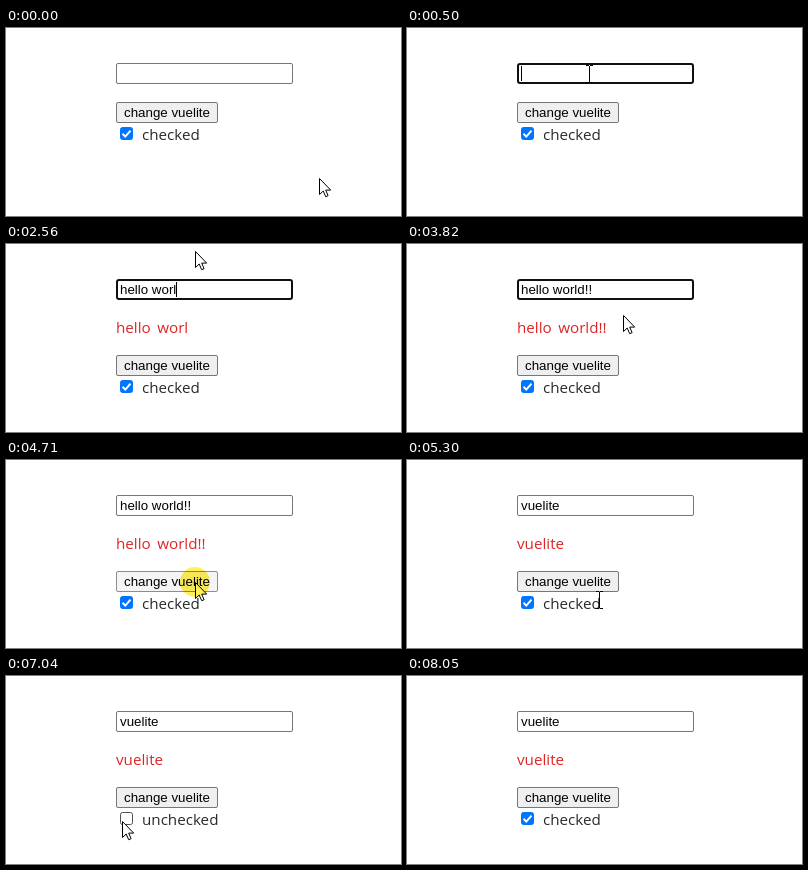
An HTML page with a canvas for the animation above (8.37 s loop, 395 by 188 pixels).

```html
<!DOCTYPE html>
<html lang="en">
<head>
<meta charset="utf-8">
<title>Two-way binding demo</title>
<style>
  html, body { margin: 0; width: 100%; height: 100%; overflow: hidden; background: #fff; }
  canvas { display: block; width: 395px; height: 188px; }
</style>
</head>
<body>
<canvas id="stage"></canvas>
<script>
const LOOP = 8370, WIDTH = 395, HEIGHT = 188;
const UI_FONT = '13.333px "Liberation Sans", Arial, sans-serif';
const PAGE_FONT = '15.2px "Open Sans", "Noto Sans", sans-serif';
const LEFT = 110;

const canvas = document.getElementById('stage');
const ctx = canvas.getContext('2d');
const ratio = window.devicePixelRatio || 1;
canvas.width = WIDTH * ratio;
canvas.height = HEIGHT * ratio;

// Each pointer move eases from the previous stop; bend bows the line vertically.
const origin = { x: 313, y: 150 };
const moves = [
  { from: 20, to: 360, x: 182, y: 46 },
  { from: 560, to: 740, x: 189, y: 7 },
  { from: 3660, to: 3820, x: 216, y: 71 },
  { from: 3820, to: 4440, x: 189, y: 122, bend: 38 },
  { from: 5000, to: 5300, x: 192, y: 140 },
  { from: 5300, to: 5400, x: 135, y: 146 },
  { from: 5400, to: 5660, x: 121, y: 145 },
  { from: 6980, to: 7040, x: 116, y: 145 },
  { from: 7600, to: 8050, x: 384, y: 192, bend: -58 }
];

const press = (down, hold = 90) => ({ down, up: down + hold });
const focusPress = press(400);
const buttonPress = press(4560, 250);
const togglePresses = [6180, 6540, 6900, 7450].map(down => press(down));
const presses = [focusPress, buttonPress, ...togglePresses];

// Typing comes in bursts with an even rhythm inside each one.
const bursts = [
  { text: 'h', at: 830 },
  { text: 'e', at: 1280 },
  { text: 'llo ', at: 1480, gap: 135 },
  { text: 'wo', at: 2060, gap: 70 },
  { text: 'rld', at: 2380, gap: 130 },
  { text: '!!', at: 3030, gap: 110 }
];
const keys = bursts.flatMap(({ text, at, gap }) =>
  [...text].map((char, i) => ({ char, time: at + (i && i * gap) })));

const smooth = k => k * k * (3 - 2 * k);

function pointerAt(t) {
  let { x, y } = origin;
  for (const move of moves) {
    if (t <= move.from) break;
    const k = smooth(Math.min(1, (t - move.from) / (move.to - move.from)));
    x += (move.x - x) * k;
    y += (move.y - y) * k + (move.bend || 0) * Math.sin(Math.PI * k);
  }
  return [Math.round(x), Math.round(y)];
}

function box(x, y, w, h, radius, fill, stroke, line = 1) {
  ctx.beginPath();
  ctx.roundRect(x + line / 2, y + line / 2, w - line, h - line, radius);
  ctx.fillStyle = fill;
  ctx.fill();
  ctx.strokeStyle = stroke;
  ctx.lineWidth = line;
  ctx.stroke();
}

function label(text, x, baseline, font, color) {
  ctx.font = font;
  ctx.wordSpacing = font === PAGE_FONT ? '2.5px' : '0px';
  ctx.fillStyle = color;
  ctx.fillText(text, x, baseline);
}

function drawInput(text, focused, caret) {
  box(LEFT, 35, 177, 21, focused ? 2 : 1.5, '#fff', focused ? '#101010' : '#767676', focused ? 2 : 1);
  label(text, LEFT + 4, 50, UI_FONT, '#000');
  if (caret) {
    ctx.fillRect(LEFT + 4 + Math.floor(ctx.measureText(text).width), 38, 1, 15);
  }
}

function drawButton(y, hover, active) {
  const [fill, stroke] = active ? ['#f5f5f5', '#8d8d8d']
    : hover ? ['#e5e5e5', '#4f4f4f'] : ['#efefef', '#767676'];
  box(LEFT, y, 102, 21, 1.5, fill, stroke);
  label('change vuelite', LEFT + 8, y + 15, UI_FONT, '#000');
}

function drawCheckbox(y, checked, hover) {
  const x = LEFT + 4;
  if (checked) {
    const blue = hover ? '#005cc8' : '#0075ff';
    box(x, y, 13, 13, 2, blue, blue);
    ctx.beginPath();
    ctx.moveTo(x + 2.5, y + 6.8);
    ctx.lineTo(x + 5.3, y + 9.6);
    ctx.lineTo(x + 10.5, y + 3.6);
    ctx.strokeStyle = '#fff';
    ctx.lineWidth = 2;
    ctx.stroke();
  } else {
    box(x, y, 13, 13, 2, '#fff', hover ? '#4f4f4f' : '#767676');
  }
  label(checked ? 'checked' : 'unchecked', LEFT + 26, y + 13, PAGE_FONT, '#2a2a2a');
}

function drawArrow(x, y) {
  ctx.save();
  ctx.translate(x + 0.5, y + 0.5);
  const outline = new Path2D('M0 0V16L3.7 12.5L6.2 18.2L8.6 17.2L6.2 11.6H11.2Z');
  ctx.fillStyle = '#fff';
  ctx.fill(outline);
  ctx.strokeStyle = '#000';
  ctx.lineWidth = 1;
  ctx.stroke(outline);
  ctx.restore();
}

function drawTextCursor(x, y) {
  ctx.fillStyle = '#000';
  ctx.fillRect(x, y - 8, 1, 16);
  for (const end of [y - 9, y + 8]) {
    ctx.fillRect(x - 3, end, 3, 1);
    ctx.fillRect(x + 1, end, 3, 1);
  }
}

function drawClickSpot(x, y) {
  ctx.save();
  ctx.globalCompositeOperation = 'multiply';
  ctx.beginPath();
  ctx.arc(x, y, 15, 0, Math.PI * 2);
  ctx.fillStyle = '#fff05a';
  ctx.fill();
  ctx.restore();
}

function draw(t) {
  const [mx, my] = pointerAt(t);
  const over = (x, y, w, h) => mx >= x && mx < x + w && my >= y && my < y + h;
  const held = ({ down, up }) => t >= down && t < up;

  const struck = keys.filter(key => key.time <= t);
  const text = t >= buttonPress.up ? 'vuelite' : struck.map(key => key.char).join('');
  const focused = t >= focusPress.down && t < buttonPress.down;
  const lastInput = struck.length ? struck[struck.length - 1].time : focusPress.down;
  const caret = focused && (t - lastInput) % 1000 < 500;
  const checked = togglePresses.filter(({ up }) => up <= t).length % 2 === 0;

  // The filled paragraph pushes the controls below it down.
  const shift = text ? 37 : 0;
  const buttonY = 74 + shift, checkY = 99 + shift;

  ctx.setTransform(ratio, 0, 0, ratio, 0, 0);
  ctx.fillStyle = '#fff';
  ctx.fillRect(0, 0, WIDTH, HEIGHT);

  drawInput(text, focused, caret);
  label(text, LEFT, 89, PAGE_FONT, '#e02424');
  drawButton(buttonY, over(LEFT, buttonY, 102, 21), held(buttonPress));
  drawCheckbox(checkY, checked, over(LEFT + 4, checkY, 13, 13));

  const overText = over(LEFT, 35, 177, 21)
    || over(LEFT + 26, checkY - 3, checked ? 58 : 77, 20);
  (overText ? drawTextCursor : drawArrow)(mx, my);
  if (presses.some(held)) drawClickSpot(mx, my);
}

const start = performance.now();
function tick() {
  draw((performance.now() - start) % LOOP);
  requestAnimationFrame(tick);
}
tick();
</script>
</body>
</html>
```
